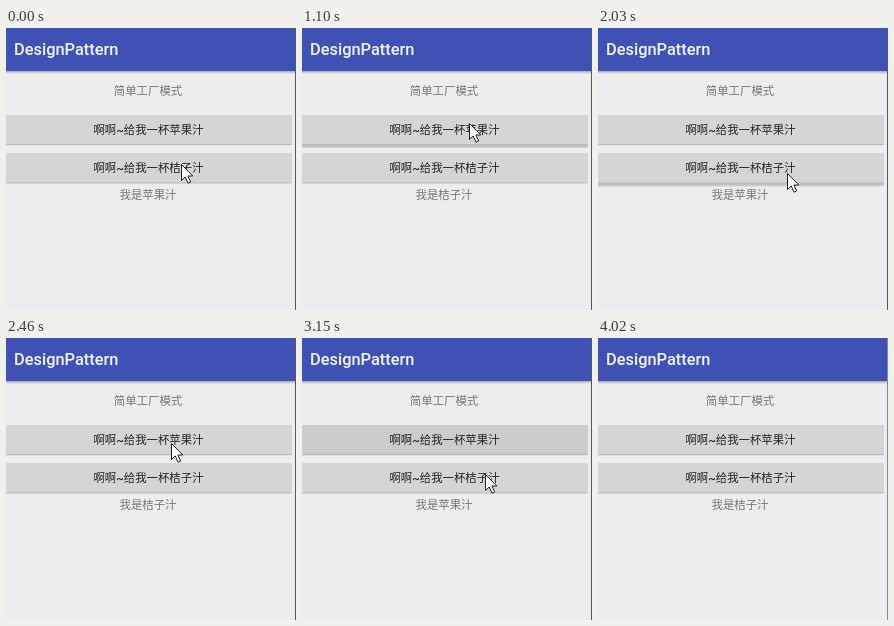
An HTML page that plays this animation: 290 px wide and 282 px high, repeating every 4.12 s.

```html
<!DOCTYPE html>
<html lang="zh-CN">
<head>
<meta charset="utf-8">
<style>
html, body { margin: 0; width: 100%; height: 100%; overflow: hidden; background: #ededef; }
svg { display: block; }
text { font: 11.4px Roboto, "Noto Sans CJK SC", "Noto Sans CJK", sans-serif; text-anchor: middle; fill: #757577; }
.title { font-size: 16.4px; font-weight: 500; text-anchor: start; fill: #f4f5fc; }
.caption { font-weight: 500; fill: #232323; }
</style>
</head>
<body>
<svg width="290" height="282" viewBox="0 0 290 282">
  <defs>
    <linearGradient id="fade" x2="0" y2="1">
      <stop stop-color="#8d8f9b"/>
      <stop offset="1" stop-color="#ededef"/>
    </linearGradient>
  </defs>
  <rect width="290" height="282" fill="#ededef"/>
  <rect y="42" width="290" height="4" fill="url(#fade)"/>
  <rect width="290" height="43" fill="#3f51b5"/>
  <text class="title" x="8" y="27">DesignPattern</text>
  <text x="142" y="67.2">简单工厂模式</text>
  <g id="buttons"></g>
  <text id="result" x="142" y="171.2"></text>
  <rect id="edge" x="289" width="1" height="282"/>
  <path id="cursor" d="M.5 .5V16.5L4.2 13L7 19.2L9.6 18L6.9 12H11.8Z" fill="#fff" stroke="#1c1c24"/>
</svg>
<script>
const LOOP = 4120;
const APPLE = '苹果汁', ORANGE = '桔子汁';
const REST = 0, RAISED = 1, HELD = 2, DARK = 3, RIPPLE = 4;
const $ = id => document.getElementById(id);

// start, cursor x, cursor y, drink, first button, second button
const steps = [
  [0, 175, 136, APPLE, REST, REST],
  [270, 175, 136, APPLE, REST, RAISED],
  [390, 175, 136, ORANGE, REST, HELD],
  [540, 175, 136, ORANGE, REST, DARK],
  [690, 129, 126, ORANGE, REST, REST],
  [810, 155, 115, ORANGE, REST, REST],
  [960, 167, 95, ORANGE, REST, REST],
  [1100, 167, 95, ORANGE, RAISED, REST],
  [1220, 167, 95, APPLE, HELD, REST],
  [1340, 174, 117, APPLE, RIPPLE, REST],
  [1490, 182, 132, APPLE, REST, REST],
  [1610, 189, 145, APPLE, REST, REST],
  [2030, 189, 145, APPLE, REST, RAISED],
  [2180, 189, 145, ORANGE, REST, DARK],
  [2330, 177, 125, ORANGE, REST, REST],
  [2460, 165, 105, ORANGE, REST, REST],
  [2730, 174, 113, ORANGE, REST, REST],
  [2880, 174, 113, ORANGE, RAISED, REST],
  [3000, 178, 126, APPLE, HELD, REST],
  [3150, 183, 136, APPLE, DARK, REST],
  [3270, 183, 136, APPLE, REST, RAISED],
  [3390, 183, 136, ORANGE, REST, HELD],
  [3510, 195, 258, ORANGE, REST, HELD],
  [3630, 300, 300, ORANGE, REST, HELD],
  [3750, 300, 300, ORANGE, REST, REST]
];

function button(y, drink, state) {
  const raised = state === RAISED || state === HELD;
  const dark = state === HELD || state === DARK;
  const box = (top, height, fill, extra = '') =>
    `<rect x="-4" y="${top}" width="290" height="${height}" rx="2" fill="${fill}" ${extra}/>`;
  return (raised ? box(y + 1, 32, '#d3d3d5') + box(y + 1, 31, '#c2c2c4') : '')
    + box(y, 30.2, '#b9b9bb')
    + box(y, 29, dark ? '#cdcbcd' : '#d5d5d5')
    + (state === RIPPLE ? `<rect x="22" y="${y}" width="244" height="29" fill="#c8c8c8"/>` : '')
    + `<text class="caption" x="142.5" y="${y + 18.9}">啊啊~给我一杯${drink}</text>`;
}

let shown;
function draw(now) {
  const t = now % LOOP;
  const step = steps.findLast(s => s[0] <= t);
  if (step !== shown) {
    const [, x, y, drink, first, second] = shown = step;
    $('buttons').innerHTML = button(87, APPLE, first) + button(125.4, ORANGE, second);
    $('result').textContent = '我是' + drink;
    $('cursor').setAttribute('transform', `translate(${x} ${y})`);
  }
  $('edge').setAttribute('fill', t < 4020 ? '#55575c' : '#8a8a8e');
  requestAnimationFrame(draw);
}
draw(0);
</script>
</body>
</html>
```
